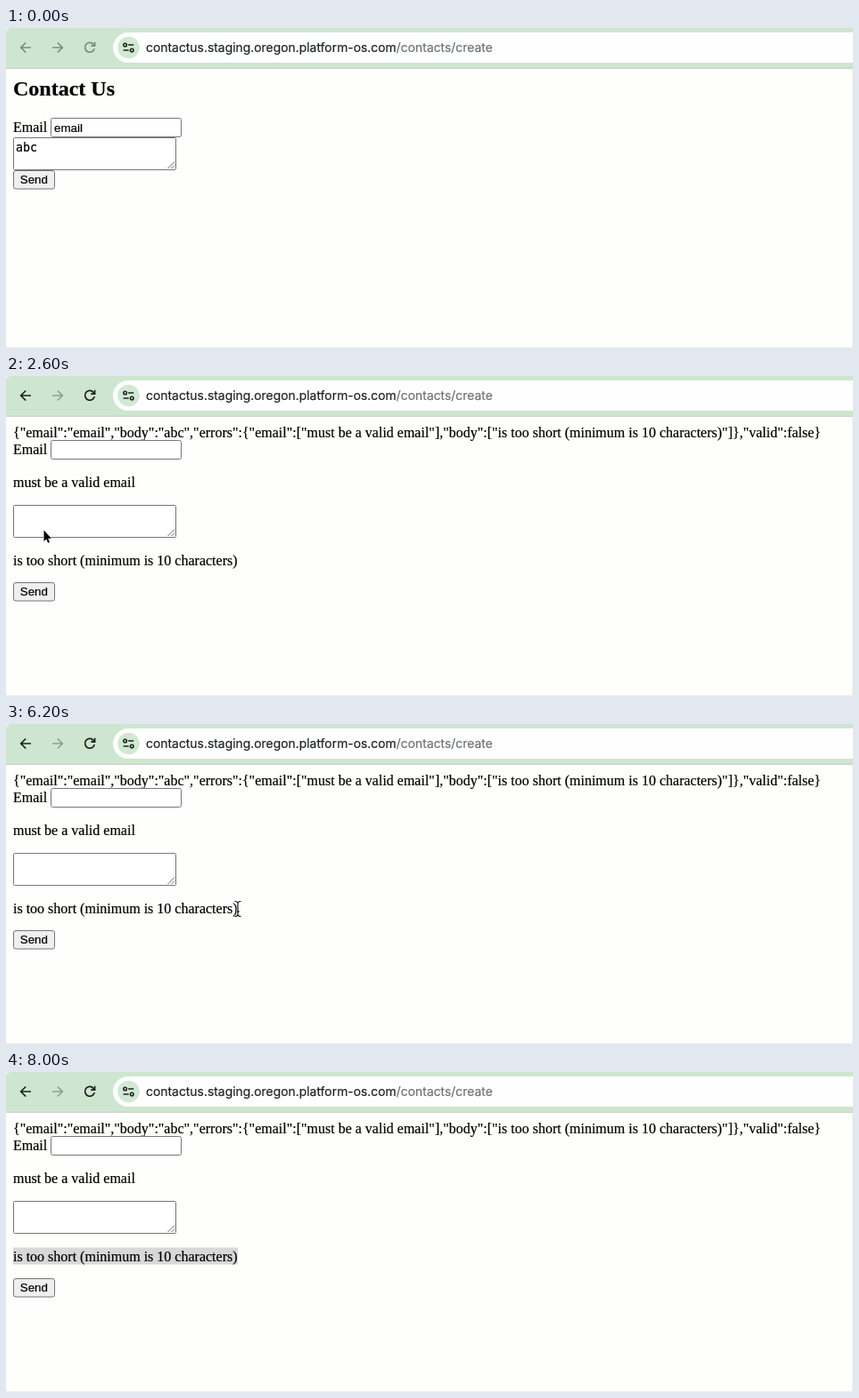
These frames come from a looping animation (950 by 360 pixels, 8.4 s). An HTML page:

```html
<!DOCTYPE html>
<html lang="en">
<head>
<meta charset="utf-8">
<title>Contact form</title>
<style>
html, body { margin: 0; width: 100%; height: 100%; overflow: hidden; background: #fefefd; }
svg { display: block; width: 950px; height: 360px; }
text { white-space: pre; stroke: #000; stroke-width: .2; }
.page { font: 16px "Liberation Serif", "Times New Roman", serif; fill: #000; }
.title { font-weight: bold; font-size: 24px; }
.ui { font: 13.33px "Liberation Sans", Arial, sans-serif; }
.mono { font: 13.33px "DejaVu Sans Mono", monospace; }
.url { font: 13.9px Inter, Roboto, sans-serif; fill: #202421; stroke: #202421; }
.path { fill: #707571; stroke: #707571; }
.icon { fill: none; stroke-width: 1.7; }
.field { fill: #fff; stroke: #767676; }
.button { fill: #efefef; stroke: #767676; }
.grip { fill: none; stroke: #555; stroke-width: .9; }
</style>
</head>
<body>
<svg viewBox="0 0 950 360">
  <defs>
    <g id="input"><rect class="field" x="50.5" y=".5" width="146" height="21" rx="2"/></g>
    <g id="area">
      <rect class="field" x="8.5" y=".5" width="182" height="36" rx="1"/>
      <path class="grip" d="M181.5 35L189 27.5M185.5 35L189 31.5"/>
    </g>
    <g id="send">
      <rect class="button" x="8.5" y=".5" width="46" height="20.5" rx="2.5"/>
      <text class="ui" x="15.8" y="15">Send</text>
    </g>
  </defs>
  <rect width="950" height="360" fill="#fefefd"/>
  <path d="M0 359.5H950M949.5 46V360" stroke="#ececec"/>

  <rect width="950" height="45" fill="#cee6d0"/>
  <path d="M0 45.3H950" stroke="#c3c8c3"/>
  <path d="M0 0H6Q0 0 0 6Z" fill="#eef3ee"/>
  <rect x="120" y="5" width="860" height="34" rx="17" fill="#fefefe"/>
  <circle cx="137.5" cy="22" r="12.2" fill="#d1e8d3"/>
  <g class="icon" stroke="#202421" style="stroke-width:1.5">
    <circle cx="133.6" cy="19" r="1.8"/>
    <circle cx="141.2" cy="25" r="1.8"/>
    <path d="M137 19H143.2M131.6 25H137.6"/>
  </g>
  <path id="back" class="icon" d="M28 22H17M22.2 16.5L16.7 22L22.2 27.5"/>
  <path id="next" class="icon" d="M52 22H63M57.8 16.5L63.3 22L57.8 27.5"/>
  <path id="reload" class="icon" d="M99.2 23.2A5.4 5.4 0 1 1 98 18.2L99.2 19.6M99.6 15.8V20.2H95.2"/>
  <text class="url" x="157" y="27">contactus.staging.oregon.platform-os.com<tspan class="path">/contacts/create</tspan></text>

  <g id="form" class="page">
    <text class="title" x="8" y="76">Contact Us</text>
    <text x="8" y="117">Email</text>
    <use href="#input" y="101"/>
    <text class="ui" x="54" y="116.6">email</text>
    <use href="#area" y="123"/>
    <text class="mono" x="11" y="139">abc</text>
    <use href="#send" y="160"/>
  </g>

  <g id="result" class="page">
    <rect id="mark" height="19"/>
    <text x="8" y="68.7">{"email":"email","body":"abc","errors":{"email":["must be a valid email"],"body":["is too short (minimum is 10 characters)"]},"valid":false}</text>
    <text x="8" y="88">Email</text>
    <use href="#input" y="72"/>
    <text x="8" y="125">must be a valid email</text>
    <use href="#area" y="145"/>
    <text x="8" y="212.7">is too short (minimum is 10 characters)</text>
    <use href="#send" y="232"/>
  </g>

  <g id="cursor">
    <path id="arrow" d="M0 0V12.4L2.8 9.9L4.6 14.2L6.5 13.4L4.7 9.2H8.4Z" fill="#000" stroke="#fff" stroke-width="1" paint-order="stroke"/>
    <g id="beam" fill="none">
      <path d="M-3.5 -8.5Q0 -8.5 0 -6V6Q0 8.5 -3.5 8.5M3.5 -8.5Q0 -8.5 0 -6V6Q0 8.5 3.5 8.5M-2 3H2" stroke="#fff" stroke-width="2.6"/>
      <path d="M-3.5 -8.5Q0 -8.5 0 -6V6Q0 8.5 -3.5 8.5M3.5 -8.5Q0 -8.5 0 -6V6Q0 8.5 3.5 8.5M-2 3H2" stroke="#111" stroke-width="1.2"/>
    </g>
    <path id="edge" d="M-2 -.8H4V-3.6L8 0L4 3.6V.8H-2Z" fill="#000" stroke="#fff" stroke-width="1.4" paint-order="stroke"/>
  </g>
</svg>
<script>
const LOOP = 8400, STEP = 200;
const el = id => document.getElementById(id);
const show = (id, on) => el(id).setAttribute("display", on ? "inline" : "none");
const set = (id, attrs) => {
  for (const k in attrs) el(id).setAttribute(k, attrs[k]);
};

// time, x, y, pointer shape
const path = [
  [200, 170, 324, "arrow"], [400, 170, 324, "arrow"],
  [1400, 95.5, 229.5, "arrow"], [2000, 42.5, 173.5, "arrow"],
  [3000, 42.5, 173.5, "arrow"], [3200, 106, 112, "beam"],
  [4000, 106, 112, "beam"], [4200, 80.5, 143, "beam"],
  [4400, 80.5, 143, "beam"], [4800, 145, 121, "beam"],
  [5400, 0, 122.3, "edge"], [5600, 0, 123, "edge"],
  [5800, 90, 170, "arrow"], [6200, 260, 208, "beam"],
  [6600, 0, 212, "edge"], [7000, 0, 213, "edge"],
  [7200, 460, 195, "arrow"], [7400, 460, 195, "arrow"],
  [7600, 490, 250, "arrow"], [7800, 490, 250, "arrow"]
];

function pointer(t) {
  let i = 0;
  while (i < path.length - 2 && path[i + 1][0] <= t) i++;
  const [t0, x0, y0, shape] = path[i], [t1, x1, y1] = path[i + 1];
  const k = Math.min(1, Math.max(0, (t - t0) / (t1 - t0)));
  return { x: x0 + (x1 - x0) * k, y: y0 + (y1 - y0) * k, shape };
}

function select(t, x) {
  const second = t >= 6200;
  const end = second ? 260 : 145;
  const done = second ? t >= 6600 : t >= 5400;
  const left = done ? 8 : Math.min(end, Math.max(8, x));
  set("mark", {
    x: left, y: second ? 197.5 : 110, width: t < 4800 ? 0 : end - left,
    fill: t >= 7800 ? "#d8d8d9" : "#b7d5fb"
  });
}

function draw(time) {
  const t = Math.floor(time % LOOP / STEP) * STEP;
  const sent = t >= 2600, ink = t < 200 ? "#7d8c80" : "#1d211e";
  set("back", { stroke: ink });
  set("reload", { stroke: ink });
  set("next", { stroke: sent ? "#8fa092" : ink });
  show("form", !sent);
  show("result", sent);

  const p = pointer(t);
  show("cursor", t >= 200 && t < 8000);
  set("cursor", { transform: `translate(${p.x} ${p.y})` });
  for (const id of ["arrow", "beam", "edge"]) show(id, id === p.shape);
  select(t, p.x);
}

const start = performance.now();
function tick() {
  draw(performance.now() - start);
  requestAnimationFrame(tick);
}
tick();
</script>
</body>
</html>
```
